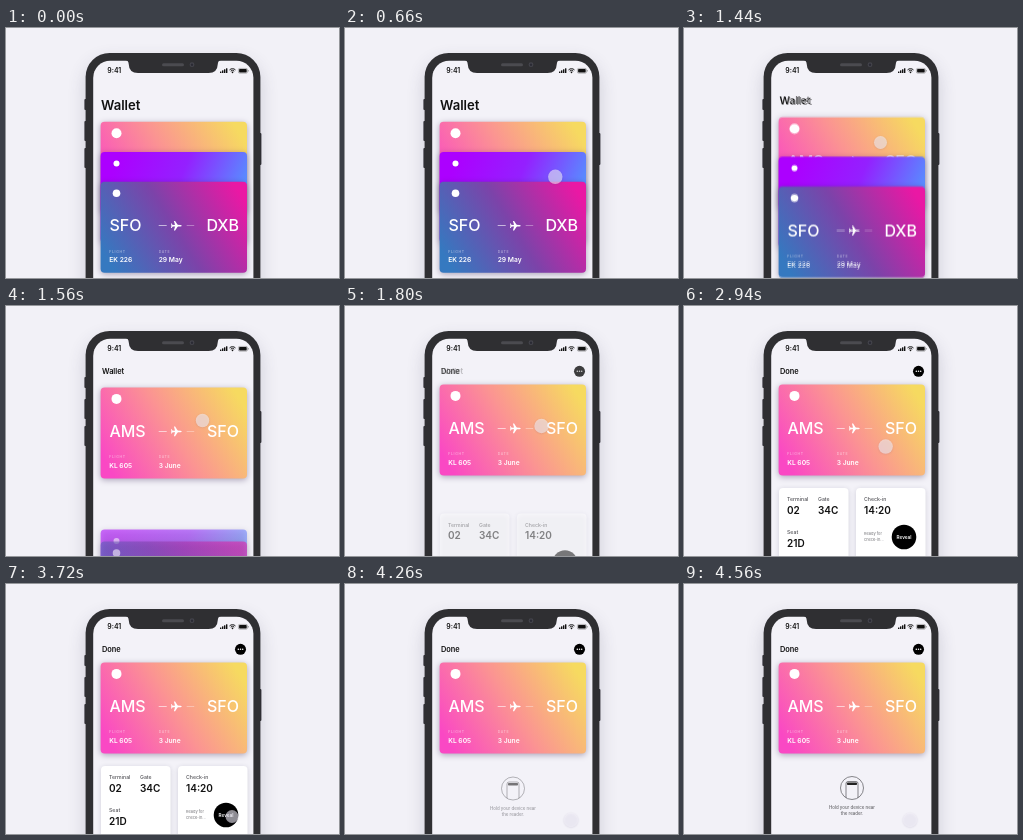
An HTML page with a canvas for the animation above (4620 ms loop, 333 px wide and 250 px high).

```html
<!DOCTYPE html>
<html lang="en">
<head>
<meta charset="utf-8">
<title>Wallet</title>
<style>
html, body { margin: 0; width: 100%; height: 100%; overflow: hidden; background: #f2f1f7; }
canvas { display: block; width: 333px; height: 250px; }
</style>
</head>
<body>
<canvas id="stage"></canvas>
<script>
const W = 333, H = 250, LOOP = 4620, STEP = 60;
const BODY = '#2f2f32', SCREEN = '#f3f2f8';
const dpr = window.devicePixelRatio || 1;
const canvas = document.getElementById('stage');
const ghost = document.createElement('canvas');
for (const c of [canvas, ghost]) {
  c.width = Math.round(W * dpr);
  c.height = Math.round(H * dpr);
}
const ctx = canvas.getContext('2d');
const ghostCtx = ghost.getContext('2d');
ctx.scale(dpr, dpr);

const linear = p => p;
const smooth = p => p * p * (3 - 2 * p);
const easeOut = p => 1 - (1 - p) ** 3;

// Value at time t along [time, value] stops.
function track(t, stops, ease = linear) {
  if (t <= stops[0][0]) return stops[0][1];
  for (let i = 1; i < stops.length; i++) {
    const [t0, a] = stops[i - 1], [t1, b] = stops[i];
    if (t <= t1) return a + (b - a) * ease((t - t0) / (t1 - t0));
  }
  return stops[stops.length - 1][1];
}

function layer(alpha, draw) {
  if (alpha <= 0) return;
  ctx.save();
  ctx.globalAlpha *= alpha;
  draw();
  ctx.restore();
}

function text(str, x, y, size, weight, color, align = 'left') {
  ctx.font = `${weight} ${size}px Inter, sans-serif`;
  ctx.textAlign = align;
  ctx.fillStyle = color;
  ctx.fillText(str, x, y);
}

function box(x, y, w, h, r, fill) {
  ctx.beginPath();
  ctx.roundRect(x, y, w, h, r);
  ctx.fillStyle = fill;
  ctx.fill();
}

function disc(x, y, r, fill) {
  ctx.beginPath();
  ctx.arc(x, y, r, 0, 7);
  ctx.fillStyle = fill;
  ctx.fill();
}

function shadowed(color, blur, dy, draw) {
  ctx.save();
  ctx.shadowColor = color;
  ctx.shadowBlur = blur * dpr;
  ctx.shadowOffsetY = dy * dpr;
  draw();
  ctx.restore();
}

function plane(x, y) {
  ctx.save();
  ctx.translate(x, y);
  ctx.fillStyle = '#fff';
  ctx.beginPath();
  ctx.ellipse(0.2, 0, 5.2, 0.9, 0, 0, 7);
  ctx.fill();
  for (const side of [-1, 1]) {
    ctx.beginPath();
    ctx.moveTo(2, 0);
    ctx.lineTo(-1.2, 4.8 * side);
    ctx.lineTo(-2.4, 4.8 * side);
    ctx.lineTo(-1, 0);
    ctx.moveTo(-3.2, 0);
    ctx.lineTo(-4.6, 2.2 * side);
    ctx.lineTo(-5.4, 2.2 * side);
    ctx.lineTo(-4.7, 0);
    ctx.fill();
  }
  ctx.restore();
}

// Each gradient runs along axis [x0, y0, x1, y1], relative to the card.
const cards = {
  sunset: {
    colors: ['#fa48c4', '#fb9492', '#f6da60'], axis: [10, 84, 136, 7], logo: 5,
    from: 'AMS', to: 'SFO', flight: 'KL 605', date: '3 June'
  },
  violet: { colors: ['#ac00ff', '#9420ff', '#5592ff'], axis: [20, 0, 140, 50], logo: 3 },
  dusk: {
    colors: ['#3579c0', '#7c43a9', '#ea18a4'], axis: [10, 84, 136, 7], logo: 3.8,
    from: 'SFO', to: 'DXB', flight: 'EK 226', date: '29 May'
  }
};

function drawCard(card, y) {
  const [x0, y0, x1, y1] = card.axis;
  const fill = ctx.createLinearGradient(95 + x0, y + y0, 95 + x1, y + y1);
  card.colors.forEach((c, i) => fill.addColorStop(i / 2, c));
  shadowed('rgba(40,20,70,.36)', 6, 1.5, () => box(94.6, y, 146.4, 91, 4, fill));
  disc(110.5, y + 11.5, card.logo, '#fff');
  if (!card.from) return;
  text(card.from, 103.4, y + 49.7, 16, 500, '#fff');
  text(card.to, 233, y + 49.7, 16, 500, '#fff', 'right');
  box(152.7, y + 43.6, 8, 0.8, 0, 'rgba(255,255,255,.8)');
  box(180.7, y + 43.6, 7.5, 0.8, 0, 'rgba(255,255,255,.45)');
  plane(170.3, y + 44);
  ctx.letterSpacing = '0.6px';
  text('FLIGHT', 103.2, y + 71, 3.6, 500, 'rgba(255,255,255,.5)');
  text('DATE', 152.7, y + 71, 3.6, 500, 'rgba(255,255,255,.5)');
  ctx.letterSpacing = '0px';
  text(card.flight, 103.2, y + 80.3, 6.7, 600, '#fff');
  text(card.date, 152.7, y + 80.3, 6.7, 600, '#fff');
}

function screenPath() {
  ctx.beginPath();
  ctx.roundRect(87.2, 32.8, 160.2, 270, 17);
}

function phoneBody() {
  ctx.fillStyle = '#f2f1f7';
  ctx.fillRect(0, 0, W, H);
  for (const [y, h] of [[71, 11], [93, 20], [120, 20]]) box(78.4, y, 3, h, 1, BODY);
  box(252.4, 105, 3, 32, 1, BODY);
  shadowed('rgba(60,60,90,.2)', 18, 8, () => box(79.6, 25, 174.8, 280, 24, BODY));
  screenPath();
  ctx.fillStyle = SCREEN;
  ctx.fill();
}

function notch() {
  ctx.beginPath();
  ctx.moveTo(119.5, 32);
  ctx.quadraticCurveTo(122.5, 32.5, 122.7, 36);
  ctx.quadraticCurveTo(123, 45, 132, 45);
  ctx.lineTo(202.5, 45);
  ctx.quadraticCurveTo(211.5, 45, 211.8, 36);
  ctx.quadraticCurveTo(212, 32.5, 215, 32);
  ctx.fillStyle = BODY;
  ctx.fill();
  box(156, 35.2, 22, 3, 1.5, '#4b4b50');
  disc(186, 36.7, 2.4, '#44444b');
  disc(186, 36.7, 1.2, '#2a2a34');
}

function statusBar() {
  text('9:41', 101.3, 45.2, 6.9, 600, '#111');
  for (let i = 0; i < 4; i++) {
    const h = 1.7 + i * 1.05;
    box(214 + i * 2, 45.1 - h, 1.4, h, 0.3, '#111');
  }
  ctx.strokeStyle = '#111';
  ctx.lineWidth = 1;
  for (const r of [2.5, 4.2]) {
    ctx.beginPath();
    ctx.arc(226.5, 44.9, r, -Math.PI * 0.75, -Math.PI * 0.25);
    ctx.stroke();
  }
  disc(226.5, 44.4, 0.8, '#111');
  ctx.beginPath();
  ctx.roundRect(232.4, 40.4, 9, 4.8, 1.2);
  ctx.lineWidth = 0.5;
  ctx.strokeStyle = '#777';
  ctx.stroke();
  box(233.1, 41.1, 7.6, 3.4, 0.7, '#111');
  box(241.9, 42, 0.7, 1.6, 0.3, '#777');
}

function header(t) {
  const detail = track(t, [[1620, 0], [1860, 1]]);
  layer(1 - detail, () => {
    const size = track(t, [[1320, 13.1], [1440, 10.2], [1560, 7.4]]);
    const y = track(t, [[1320, 82], [1440, 75.6], [1560, 68]]);
    const x = track(t, [[1320, 95], [1560, 96]]);
    text('Wallet', x, y, size, 600, '#111');
  });
  layer(detail, () => {
    text('Done', 96, 68, 7.4, 600, '#111');
    disc(234.5, 65.3, 5.5, '#000');
    for (const dx of [-2.2, 0, 2.2]) disc(234.5 + dx, 65.3, 0.75, '#fff');
  });
}

function field(label, value, x, y) {
  text(label, x, y, 5.2, 500, '#55555a');
  text(value, x, y + 12.6, 10, 600, '#111');
}

function tiles(t) {
  const dy = t < 3000
    ? track(t, [[1680, 70], [2100, 0]], easeOut)
    : track(t, [[3840, 0], [4140, 70]], smooth);
  const alpha = Math.min(track(t, [[1680, 0], [1920, 1]]), track(t, [[3840, 1], [4140, 0]]));
  layer(alpha, () => {
    ctx.translate(0, dy);
    for (const x of [95, 172])
      shadowed('rgba(40,40,70,.16)', 5, 1, () => box(x, 182, 69.5, 74, 4, '#fff'));
    field('Terminal', '02', 103, 195);
    field('Gate', '34C', 134, 195);
    field('Seat', '21D', 103, 228);
    field('Check-in', '14:20', 180, 195);
    text('Ready for', 180, 229.4, 3.9, 500, '#88888c');
    text('check-in...', 180, 235, 3.9, 500, '#88888c');
    disc(220, 231, 12.3, '#000');
    text('Reveal', 220, 232.8, 4.7, 600, '#fff', 'center');
  });
}

function reader(t) {
  layer(track(t, [[4080, 0], [4380, 1]]), () => {
    ctx.translate(0, track(t, [[4080, 8], [4380, 0]], easeOut));
    ctx.strokeStyle = '#55555a';
    ctx.lineWidth = 0.7;
    ctx.beginPath();
    ctx.arc(168, 204, 11.5, 0, 7);
    ctx.stroke();
    ctx.save();
    ctx.clip();
    ctx.beginPath();
    ctx.roundRect(162, 197.5, 12, 24, 2);
    ctx.stroke();
    box(163, 198.4, 10, 2.6, 0.8, '#222');
    ctx.restore();
    text('Hold your device near', 168, 225, 4.4, 500, '#66666a', 'center');
    text('the reader.', 168, 231, 4.4, 500, '#66666a', 'center');
  });
}

function cursor(t) {
  layer(track(t, [[480, 0], [600, 1]]), () => {
    const x = track(t, [[480, 216], [660, 210.3], [1020, 196.5], [2700, 196.5], [3600, 226]], smooth);
    const y = track(t, [[480, 172], [660, 148.8], [1020, 114.5], [1620, 114.5], [1860, 121],
      [2700, 121], [3600, 232.5], [3840, 232.5], [4200, 236]], smooth);
    const press = Math.max(
      track(t, [[1200, 0], [1320, 1], [1500, 1], [1680, 0]]),
      track(t, [[3600, 0], [3720, 1], [3840, 0]]));
    shadowed('rgba(70,60,110,.25)', 2, 0.5, () =>
      disc(x, y, 7.2 - 0.7 * press, 'rgba(246,245,251,.56)'));
  });
}

function scene(t) {
  phoneBody();
  ctx.save();
  screenPath();
  ctx.clip();
  header(t);
  tiles(t);
  reader(t);
  drawCard(cards.sunset, track(t, [[1320, 93.8], [1440, 88.8], [1560, 81.4], [1680, 78.4]]));
  layer(track(t, [[1440, 1], [1560, 0.55], [1680, 0]]), () => {
    drawCard(cards.violet, track(t, [[1320, 124], [1440, 129.2], [1560, 223.5], [1680, 262]]));
    drawCard(cards.dusk, track(t, [[1320, 153.7], [1440, 159.2], [1560, 235.5], [1680, 268]]));
  });
  cursor(t);
  ctx.restore();
  notch();
  statusBar();
}

function render(t) {
  const blended = t >= 1380 && t <= 1500;
  if (blended) {
    scene(t - STEP / 2);
    ghostCtx.drawImage(canvas, 0, 0);
  }
  scene(t);
  if (blended) layer(0.45, () => ctx.drawImage(ghost, 0, 0, W, H));
}

const start = performance.now();
function tick() {
  const t = (performance.now() - start) % LOOP;
  render(Math.floor(t / STEP) * STEP);
  requestAnimationFrame(tick);
}
tick();
</script>
</body>
</html>
```
